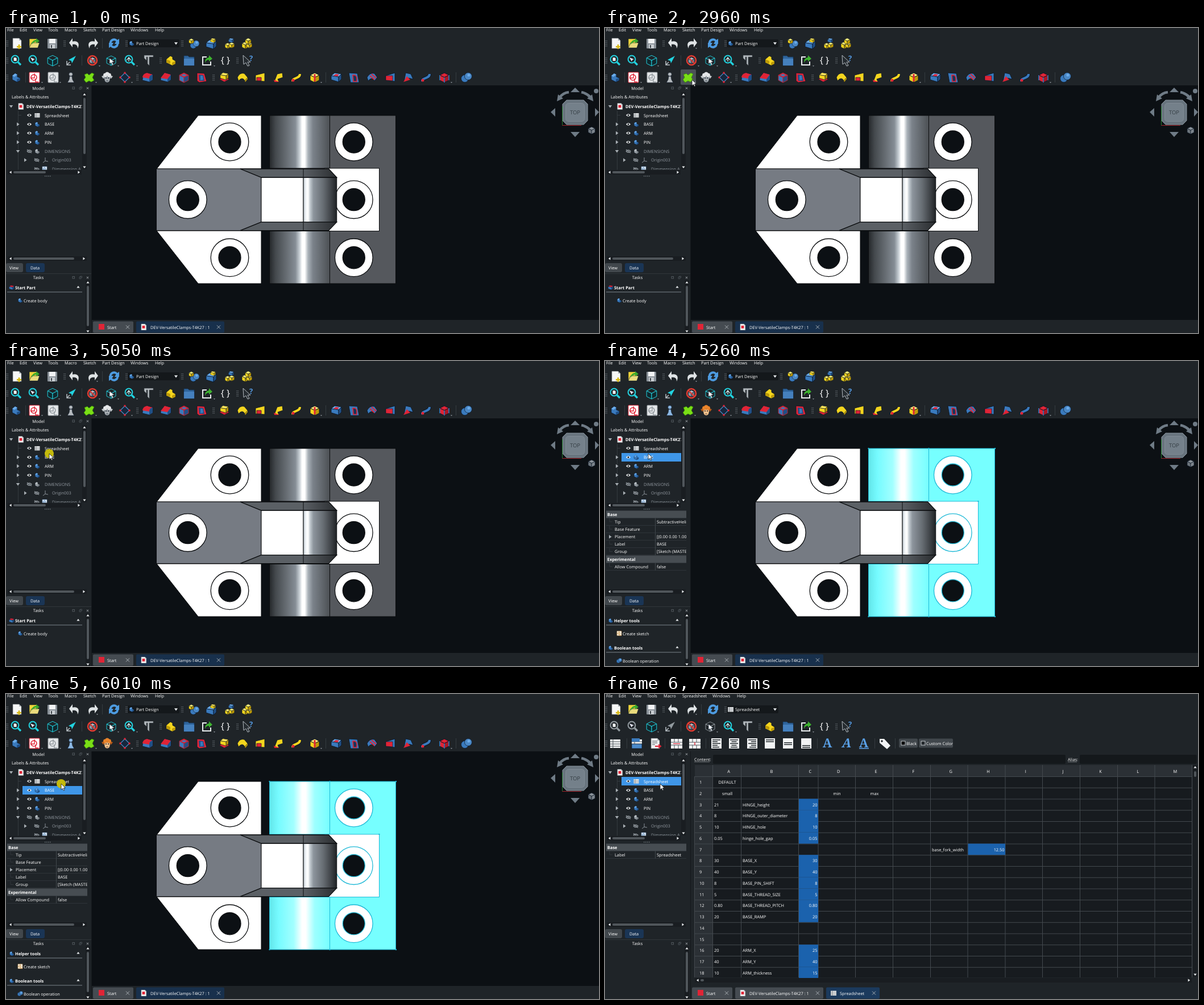
Recreate the animation shown at these times as an HTML page. Size 1043x537 px, loop 8 s.

```html
<!DOCTYPE html>
<html lang="en">
<head>
<meta charset="utf-8">
<title>Parametric model</title>
<style>
html, body { margin: 0; width: 100%; height: 100%; overflow: hidden; background: #1f2428; }
svg { display: block; width: 100%; height: 100%; }
text { font: 7.4px "Open Sans", "Noto Sans", sans-serif; fill: #fff; white-space: pre; text-rendering: geometricPrecision; }
.b { font-weight: 700; }
.dim { fill: #9299a0; }
</style>
</head>
<body>
<svg id="stage" viewBox="0 0 1043 537" preserveAspectRatio="xMinYMin"></svg>
<script>
const NAME = 'DEV-VersatileClamps-T4K27';
const BG = '#1f2428', VIEW = '#0c1014', CYAN = '#22d3e0', BLUE = '#3a7abd', NAVY = '#204f86',
  SKY = '#6cacea', YEL = '#f4d51e', GOLD = '#bd9a08', RED = '#e02436', INK = '#0a1626', GREY = '#8b9299', PALE = '#e8ebed';

// Drawing helpers
const P = (d, fill = 'none', stroke = 'none', w = 1) => `<path d="${d}" fill="${fill}" stroke="${stroke}" stroke-width="${w}"/>`;
const R = (x, y, w, h, fill, r = 0, stroke = 'none', more = '') => `<rect x="${x}" y="${y}" width="${w}" height="${h}" rx="${r}" fill="${fill}" stroke="${stroke}" ${more}/>`;
const C = (x, y, r, fill = 'none', stroke = 'none', w = 1) => `<circle cx="${x}" cy="${y}" r="${r}" fill="${fill}" stroke="${stroke}" stroke-width="${w}"/>`;
const T = (x, y, s, cls = '', anchor = 'start') =>
  `<text x="${x}" y="${y + 2.7}" class="${cls}" text-anchor="${anchor}">${s.replace('&', '&amp;')}</text>`;
const big = (x, base, s, style) => `<text x="${x}" y="${base}" text-anchor="middle" style="${style}">${s}</text>`;
const G = (id, body, extra = '') => `<g id="${id}" ${extra}>${body}</g>`;
const at = (x, y, body, s = 1) => `<g transform="translate(${x} ${y}) scale(${s})">${body}</g>`;
const grad = (id, stops) => `<linearGradient id="${id}">${stops.map(([o, c]) => `<stop offset="${o}" stop-color="${c}"/>`).join('')}</linearGradient>`;
const tri = (x, y, dir, s = 3, c = PALE) =>
  `<path d="M${-s} ${-s * .6}H${s}L0 ${s * .8}z" fill="${c}" transform="translate(${x} ${y}) rotate(${{ d: 0, l: 90, u: 180, r: 270 }[dir]})"/>`;
const grip = (x, y) => [-5, -2, 1, 4].map(d => R(x - 1.5, y + d, 1, 1.4, '#767d83') + R(x + .7, y + d, 1, 1.4, '#767d83')).join('');
const vline = (x, y) => R(x, y - 9, 1, 18, '#353b40');
const nook = (x, y) => P(`M${x} ${y}h3l-1.5 2z`, GREY);

// Icons, centred on 0,0
const slab = (a, b, c) => P('M-9-3L-3-8 9-6 4-1z', a, INK, .8) + P('M-9-3L4-1V8L-9 4z', b, INK, .8) + P('M4-1L9-6V3L4 8z', c, INK, .8);
const cube = (a, b, c, s = INK) => P('M-8-4L0-8 8-4 0 0z', a, s, .9) + P('M-8-4L0 0V9L-8 5z', b, s, .9) + P('M8-4L0 0V9L8 5z', c, s, .9);
const body = (a = SKY, b = BLUE, c = NAVY) => P('M-7-3L-2-7 2-5V-1L7 1V5L1 8-7 4z', b, INK, .8) + P('M-7-3L-2-7 2-5-3-1z', a) + P('M1 8V3L7 1V5z', c);
const page = fill => P('M-7-9H4L8-5V9H-7z', fill, '#6d7478', .7) + P('M4-9V-5H8z', '#aeb4b8');
const lens = (c, inner = '') => C(-2, -2, 6.4, 'none', c, 2) + P('M3 3L8 8', 'none', c, 3.2) + inner;
const swoop = P('M-5-3C4-6 10-1 5 9C5 3 2 1-5 2z', '#dfe3e5') + P('M-10-1L-4-9V7z', '#dfe3e5');
const bend = (c, d = GOLD) => P('M-7 7C-8 0 6 3 6-6', 'none', INK, 6) + P('M-7 7C-8 0 6 3 6-6', 'none', c, 4) + C(-6, 5, 2.5, d);
const ball = C(-3, 2, 6.5, BLUE, INK, .7) + C(3, -2, 6.5, '#4a88c6', INK, .7) + C(4, -4, 2.5, SKY);
const pawn = c => C(0, -5.5, 3.3, c, INK, .6) + P('M-2-2H2L3 4 6 9H-6L-3 4z', c, INK, .6);
const sheep = (wool, face, ear) => P('M-5-4L-10-2-7 2-4 1zM5-4L10-2 7 2 4 1z', ear) +
  P('M-5-2Q-6 9 0 9Q6 9 5-2z', face, INK, .4) + C(-3.5, -4, 3.4, wool) + C(3.5, -4, 3.4, wool) + C(0, -6, 3.6, wool) +
  C(-2, 1, 1, INK) + C(2, 1, 1, INK) + P('M-1.5 6H1.5', 'none', INK, .8);
const sketch = (sheet, c) => R(-9, -9, 18, 18, sheet, 1, c) + C(-1, 0, 5, 'none', c, 1.6) + P('M-7 1H0V-7M2 2V8H7', 'none', c, 1.4);
const lines = (ws, top, a) => R(-9, -9, 18, 18, '#f2f4f5') + ws.map((w, i) => R(a < 0 ? -7 : a ? 7 - w : -w / 2, top + i * 3.2, w, 1.5, '#22282c')).join('');
const table = R(-9, -7, 18, 15, '#f2f4f5') + P('M-9-3H9M-9 1H9M-9 5H9M-4-7V8', 'none', '#4c545a', 1);
const eye = (x, y) => P(`M${x - 4} ${y}Q${x} ${y - 4.5} ${x + 4} ${y}Q${x} ${y + 4.5} ${x - 4} ${y}z`, '#f1f3f4') + C(x, y, 1.5, BG);
const noEye = (x, y) => at(x, y, P('M-4 0Q0-4 4 0Q0 4-4 0M-4-3L4 3', 'none', '#8d949a', 1.4));
const docIcon = (x, y) => at(x, y, page('#f2f4f5') + R(-4, -4, 8, 8, RED), .6);
const close = (x, y, s = 3) => P(`M${x - s} ${y - s}l${2 * s} ${2 * s}m0 ${-2 * s}l${-2 * s} ${2 * s}`, 'none', '#aab0b5', 1);

const menu = list => list.map(([x, s]) => T(x, 3, s)).join('');
const menuHead = [[2, 'File'], [24, 'Edit'], [48, 'View'], [74, 'Tools'], [103, 'Macro']];
const combo = (label, icon) => R(214, 20, 91, 14, '#14181b', 2) + at(221, 27, icon, .55) + T(229, 27.5, label) + tri(299, 27, 'd');

function commonBars() {
  const wavy = P('M-8-1A8 8 0 0 1 6-6L9-8V1H1L3.5-3.5A5 5 0 0 0-4.5-1z', '#4d9be0');
  return at(19, 27, page('#f6f7f7') + P('M4 2V10M0 6H8', 'none', '#d6b70e', 2.4)) +
    at(50, 27, P('M-9-8H3L6-5V8H-9z', '#f0d53a', INK, .6) + P('M-9 8L-5-1H9L6 8z', '#eadb7c', INK, .6) + P('M-5 2C-4-5 0-6 3-6V-9L9-4 3 0V-3C0-3-2-1-5 2z', '#39a82d')) +
    at(81, 27, R(-8, -8, 17, 17, '#899198', 1) + R(-5, -8, 11, 8, '#f1f3f4') + R(-4, 2, 9, 7, '#c9ced2') + R(-2, 3, 2, 5, '#40474d')) +
    grip(103, 27) + at(121, 27, swoop) + `<g transform="translate(152 27) scale(-1 1)">${swoop}</g>` + nook(159, 35) + vline(169, 27) +
    at(190, 27, wavy + `<g transform="rotate(180)">${wavy}</g>`) + grip(212, 27) + grip(2, 27) + grip(2, 57) + grip(2, 87) +
    at(82, 57, cube('none', '#10282e', '#10282e', CYAN), 1.1) + nook(92, 66) + vline(133, 57) +
    at(152, 57, at(0, 0, cube('#aeb8c2', '#8a98a5', '#6d7c8a'), .7) + C(0, 0, 8, 'none', '#e53c32', 2.5) + P('M-6-6L6 6', 'none', '#e53c32', 2)) + nook(163, 66) +
    at(218, 57, lens(CYAN, P('M-6 0L-2-5 2 0M-2-5V2', 'none', '#dff', 1.2))) + nook(229, 66) +
    at(251, 57, P('M-8-9H8V-6H1V9L-2 6V-6H-4V0L-8-4z', '#b3b9bd', '#42494e', .6)) + grip(272, 57) +
    at(290, 57, P('M-8-2L-1-8 3-6V-2L8 1V6L2 9-8 4z', YEL, INK, .8) + P('M2 9V4L8 1V6zM-8-2L-1 1V6L-8 4z', GOLD)) +
    at(322, 57, P('M-9-8H-2L0-6H9V9H-9z', '#2f659d', '#17395d', .8) + R(-9, -3, 18, 12, '#4580bd')) +
    at(354, 57, P('M-1-6H-8V8H6V2', 'none', '#e9edef', 2) + P('M-4 4C-4-3 0-5 3-5V-9L9-3 3 2V-1C0-1-2 0-4 4z', '#3db32f')) + nook(365, 66) +
    big(386, 62, '{ }', 'font-size:16px') + grip(407, 57) +
    at(425, 57, P('M-8-9L5 3 0 3 3 9 0 10-3 4-7 7z', '#262c31', '#b6bdc2', 1)) + big(431, 58, '?', 'font-size:13px;font-weight:700;fill:#5499e0');
}
const viewTools = c => at(18, 57, lens(c, at(-2, -2, page('#eef1f2'), .34))) +
  at(49, 57, lens(c, P('M-6-5L2-2-1-1-2 2z', '#eef'))) +
  at(115, 57, P('M-8 8L-3 3M-8 1V8H-1', 'none', '#b9c0c5', 1.5) + P('M-5-1L8-8 1 5 0 1z', c)) +
  at(185, 57, cube('none', 'none', 'none', c) + P('M-3-4L6 3 2 3 4 8 2 9 0 4-3 6z', '#eef1f2', INK, .6)) + nook(196, 66);

function designBars() {
  const bl = slab(SKY, BLUE, NAVY), yl = slab('#ffe75a', YEL, GOLD), yc = cube('#fff07a', YEL, GOLD);
  const icons1 = [[330, at(2, 2, ball, .85) + at(-4, -4, yc, .55)], [361, at(0, 2, bl) + at(3, -5, yl, .5)],
    [393, at(-3, 4, yc, .6) + at(4, 3, yc, .6) + at(3, -5, bl, .5)], [424, at(-3, 3, yc, .75) + at(4, 3, yc, .6) + at(2, -4, yc, .65)]];
  const icons3 = [
    [18, body()], [50, sketch('#fff', RED)], [83, sketch('#e4e7e9', '#959ca1')],
    [209, P('M0-8L8 0 0 8-8 0z', '#15283e', '#4c8ed0', 1.2) + [[0, -8], [8, 0], [0, 8], [-8, 0]].map(p => C(...p, 1.8, RED)).join('')],
    [249, P('M-9 3Q-8-6-1-8L9-5V4L3 8-9 5z', BLUE, INK, .8) + P('M-9 0Q-8-7-1-8L9-5Q3-4 3 2z', RED) + P('M3 2Q3-4 9-5V4L3 8z', NAVY)],
    [281, P('M-9 2L-2-8 9-5V4L3 8-9 5z', BLUE, INK, .8) + P('M-9 1L-2-8 9-5 3 3z', RED) + P('M3 3L9-5V4L3 8z', NAVY)],
    [313, cube(RED, BLUE, NAVY, '#c81f30') + P('M-5-4L0-6 5-4 0-2z', BLUE)],
    [344, P('M-8-8L5-7 9 7-4 9-8 6z', RED, INK, .8) + P('M-5-5L3-4 5 6-4 6z', NAVY) + P('M-2-3L2-3 3 4-2 5z', BLUE)],
    [384, P('M-9 3L0 0 9 3 0 8z', RED, INK, .6) + at(0, -2, yl, .8)],
    [416, P('M-9 0Q-5-9 3-7L9 0 4 6Q0-2-7 6z', YEL, INK, .8) + P('M4 6L9 0V3L5 8z', GOLD)],
    [447, P('M-8-4L8-8V7L-8 6z', YEL, INK, .8) + P('M-6 0H2V6H-6z', RED, INK, .7)],
    [479, P('M-7 7L-2-6 7-8 8 0-1 3 1 8z', YEL, INK, .8) + P('M-8 4L2 8-7 8z', RED)],
    [511, bend(YEL, RED)], [543, yc + R(-1.5, -6, 3, 13, RED)],
    [581, bl + P('M-5-3L-1-6 5-5 2-2z', RED)],
    [612, P('M-9-8L6-7 9 9H-6z', BLUE, INK, .8) + P('M-2-4Q5-5 5 2V7H-1z', '#17355a', RED, 1.6)],
    [644, P('M-9 0Q-4-9 4-7L9 0 4 6Q0-2-7 6z', BLUE, INK, .8) + P('M-4-3L4 4M-1-6L7 1', 'none', RED, 2)],
    [676, P('M-8-3L8-8V7L-8 5z', BLUE, INK, .8) + P('M-8-3H4V6L-8 5z', RED, INK, .6)],
    [707, P('M-7 8L-4-8 5-6 9 3 1 1z', BLUE, INK, .8) + P('M-8 8L-2-2 4 4z', RED)],
    [739, bend(BLUE, RED)], [771, cube(RED, RED, '#a91625') + P('M-8-4V5M0 0V9M8-4V5', 'none', BLUE, 1.6)], [810, ball]
  ];
  return menu([...menuHead, [136, 'Sketch'], [169, 'Part Design'], [219, 'Windows'], [262, 'Help']]) + combo('Part Design', body()) + grip(310, 27) +
    icons1.map(([x, b]) => at(x, 27, b)).join('') + viewTools(CYAN) + G('hover', R(133, 73, 27, 27, '#4b5157', 2)) +
    icons3.map(([x, b]) => at(x, 87, b)).join('') +
    at(146, 87, P('M-8-5L-3-7 0-4 5-8 9-6 6 0 9 5 4 8 0 6-5 9-9 4-6 0z', '#7ade16', '#378a0a', .8)) +
    [62, 94, 157, 220, 553, 782].map(x => nook(x, 95)).join('') +
    G('idleIcons', at(114, 87, pawn('#b5babe')) + at(178, 87, sheep('#e4e6e8', '#a7adb1', '#c1c6c9'))) +
    G('liveIcons', at(114, 87, pawn('#8db8e3')) + at(178, 87, sheep('#e9842b', '#f5c28b', '#b55817'))) +
    vline(34, 87) + [231, 365].map(x => grip(x, 87)).join('') + vline(562, 87) + vline(791, 87);
}

// 3D view
const ring = (x, y, stroke) => C(x, y, 33.3, '#fff', stroke, 1.3) + C(x, y, 19.5, VIEW, stroke, 1.3);
const base = (fill, cyl, edge) => R(569.5, 154, 116, 296, fill, 0, edge) + R(463.5, 154, 106, 93, `url(#${cyl})`, 0, edge) +
  R(463.5, 357.5, 106, 92.5, `url(#${cyl})`, 0, edge) + R(560, 247, 96.5, 110.5, '#fff', 0, edge) + [200.5, 302.2, 404.3].map(y => ring(611.8, y, edge)).join('');
const mirror = s => s + `<g transform="matrix(1 0 0 -1 0 604.6)">${s}</g>`;
function scene() {
  const K = '#0b0d0f', steel = '#6f7b86', rim = '#8a959f';
  const arm = P('M264.5 248H412L449 263V341.6L412 356.6H264.5z', '#767b83', K) + R(449, 263, 74, 78.6, '#fff', 0, K) + R(523, 263, 58.7, 78.6, 'url(#armCyl)', 0, K) +
    mirror(P('M412 248H567.5L581.7 263H449z', 'url(#chamfer)', K, 1.3) + P('M523 248V263', 'none', K)) + ring(319.8, 302.2, K);
  const cubeNav = P('M986 127H1016L1023 134V163L1016 170H986L979 163V134z', '#68747e', rim) + R(984.5, 132.5, 33, 32, '#74808a', 5, '#808b95') +
    big(1001, 152, 'TOP', 'font-size:9.5px;fill:#343c43') +
    P('M978.5 138V171.5', 'none', '#237a2a') + P('M978.5 171.5H1012', 'none', '#a1242b') +
    P('M1001 105L1009 113H993zM1001 192L1009 183H993zM958 148L966 141V156zM1043 148L1036 141V156z', steel) +
    P('M974 122Q980 114 990 113M1012 113Q1022 115 1028 122', 'none', steel, 4.5) + P('M969 129L971 117 980 124zM1033 129L1031 117 1022 124z', steel) +
    C(1038, 111, 4, steel) + at(1030, 180, cube('#8b939a', '#6d757c', '#7d858c'), .75);
  return R(151, 101, 892, 413, VIEW) +
    P('M338 154H449V248H265z', '#fff', K) + P('M338 450H449V357H265z', '#fff', K) + ring(393.5, 200.5, K) + ring(393.5, 404.3, K) +
    G('basePlain', base('#55585d', 'cyl', K)) + G('basePicked', base('#76ffff', 'cylPick', '#1fb9d6') +
      [[463.5, 154], [686, 154], [463.5, 450], [686, 450], [569.5, 154], [569.5, 450], [656.5, 247]].map(p => C(...p, 1.2, '#1fb9d6')).join('')) + arm + cubeNav;
}

// Side panel
const dock = (y, s) => T(57, y, s, '', 'middle') + R(117, y - 2, 3.5, 3.5, 'none', 0, '#50575c') + P(`M129 ${y + 2}v-3h3v3zM130.5 ${y - 1}v-1.5h3v3`, 'none', '#50575c', .8) + close(143.5, y, 1.6);
const vbar = (x, up, a, b, down) => R(x - 4, up - 4, 8, down - up + 8, '#191d21') + tri(x, up, 'u', 2.6) + R(x - 2, a, 4, b - a, '#50565b', 2) + tri(x, down, 'd', 2.6);
const hbar = (y, l, a, b, r) => R(l - 5, y - 4, r - l + 10, 8, '#191d21') + tri(l, y, 'l', 2.6) + R(a, y - 2, b - a, 4, '#50565b', 2) + tri(r, y, 'r', 2.6);
const pick = (id, y) => G(id, R(29, y - 7.5, 105, 15, '#3f96e8'));
function tree() {
  const parts = [['BASE', 169.5], ['ARM', 185], ['PIN', 201]].map(([s, y]) => tri(21, y, 'r', 3.2, '#a9b0b5') + eye(41, y) + at(55, y, body(), .55) + T(68, y, s)).join('');
  return T(10, 121, 'Labels & Attributes') + pick('pickBase', 169.5) + pick('pickSheet', 153.5) +
    `<g clip-path="url(#treeClip)">` + P('M21.5 146V250M21.5 153.5H27', 'none', '#343a3f') + tri(9, 138, 'd', 3.2, '#a9b0b5') + docIcon(26, 138) + T(36, 138, NAME, 'b') +
    eye(41, 153.5) + at(55, 153.5, table, .5) + T(68, 154, 'Spreadsheet') + parts +
    tri(21, 217, 'd', 3.2, '#a9b0b5') + noEye(41, 217) + at(55, 217, body('#c3c8cc', '#9aa1a6', '#71787d'), .55) + T(68, 217, 'DIMENSIONS', 'dim') +
    tri(34, 232.5, 'r', 3.2, '#a9b0b5') + noEye(54, 232.5) + P('M69 228V234L65 237M69 234L74 235', 'none', GREY) + T(81, 232.5, 'Origin003', 'dim') +
    noEye(54, 248.5) + at(68, 248, sketch('#e7eaec', '#4a86c6'), .45) + T(81, 248.5, 'Dimmension A', 'dim') + '</g>' +
    vbar(138, 117, 123, 222, 245) + hbar(254, 8, 13, 70, 128) + [0, 3, 6, 9].map(d => R(68 + d, 260, 1.5, 1.5, '#6d747a')).join('');
}
const propHead = (y, s) => R(2, y - 6.5, 141, 13, '#474d52') + T(4, y, s, 'b');
const prop = ([y, k, v]) => R(2, y + 6, 141, .6, '#3a4045') + R(88, y - 6.5, .8, 13, '#4a5055') + P(`M8 ${y - 6}v6h5`, 'none', '#363c41', .8) + T(17, y, k) + T(91, y, v);
const task = (y, s, icon) => at(10, y, icon, .5) + T(16, y, s, 'b') + tri(127, y - 1, 'u', 2.6) + R(2, y + 7, 132, 1.6, '#596066');
function panel() {
  return R(0, 101, 151, 436, BG) + dock(106, 'Model') + tree() +
    G('propsBase', propHead(270, 'Base') + [[283, 'Tip', 'SubtractiveHelix'], [296, 'Base Feature', ''], [309.5, 'Placement', '[(0.00 0.00 1.00)'], [322.5, 'Label', 'BASE'], [335.5, 'Group', '[Sketch (MASTER)']].map(prop).join('') +
      tri(9, 309.5, 'r', 3.2, '#a9b0b5') + propHead(349, 'Experimental') + prop([362, 'Allow Compound', 'false']), 'clip-path="url(#propClip)"') +
    G('propsSheet', propHead(270, 'Base') + prop([283, 'Label', 'Spreadsheet'])) +
    hbar(406, 8, 13, 120, 137) + R(0, 414, 30, 16, '#41474c', 3) + T(14, 422, 'View', '', 'middle') + R(35, 414, 33, 16, '#1a3555', 3) + T(51, 422, 'Data', '', 'middle') +
    R(0, 432, 150, 1, '#31373b') + dock(439.5, 'Tasks') + vbar(144, 448, 454, 525, 534) +
    G('taskStart', task(457, 'Start Part', slab(RED, BLUE, NAVY)) + at(25, 479.5, body(), .5) + T(31, 480, 'Create body')) +
    G('taskBase', task(457, 'Helper tools', body()) + at(25, 479.5, sketch('#f1f3f4', '#d18a25'), .45) + T(31, 480, 'Create sketch') +
      task(505, 'Boolean tools', body()) + at(25, 527.5, ball, .5) + T(31, 528, 'Boolean operation')) + R(150, 101, 1, 436, '#14181b');
}
const tab = (x, w, fill, icon, tx, s) => R(x, 516.5, w, 20, fill, 2) + icon + T(tx, 527, s) + close(x + w - 10, 526.5);
const tabs = fill => R(151, 514, 892, 23, BG) + tab(153, 71, '#454b51', R(163, 521, 10, 10, RED), 178, 'Start') +
  tab(229, 155, fill, docIcon(242, 526.5), 254, NAME + ' : 1');

// Spreadsheet workbench
function sheet() {
  const xs = [158, 190, 240, 341, 375.5, 441, 507, 573, 638.5, 704.5, 770, 836, 902, 967.5, 1033];
  const H = 19.75, top = 145.5, mid = r => top + H * (r - .5);
  const cells = [[3, '21', 'HINGE_height', '20'], [4, '8', 'HINGE_outer_diameter', '8'], [5, '10', 'HINGE_hole', '10'], [6, '0.05', 'hinge_hole_gap', '0.05'],
    [8, '30', 'BASE_X', '30'], [9, '40', 'BASE_Y', '40'], [10, '8', 'BASE_PIN_SHIFT', '8'], [11, '5', 'BASE_THREAD_SIZE', '5'], [12, '0.80', 'BASE_THREAD_PITCH', '0.80'],
    [13, '20', 'BASE_RAMP', '20'], [16, '20', 'ARM_X', '25'], [17, '40', 'ARM_Y', '40'], [18, '10', 'ARM_thickness', '15']];
  const fill = (x, w, r) => R(x, top + H * (r - 1) - .5, w, H, '#1b62ad');
  let s = R(151, 101, 892, 413, BG) + T(157, 115, 'Content:') + R(190, 107, 620, 16, '#14181b', 2) + T(814, 115, 'Alias:') + R(835, 107, 206, 16, '#14181b', 2) +
    P('M157 119.5h27M814 119.5h16', 'none', '#c9ced2', .5) + R(158, 125, 875, 374, '#171b1f') + R(158, 125, 875, 20.5, '#2b3035') + R(158, 125, 32, 374, '#2b3035');
  xs.forEach((x, i) => {
    s += R(x - 1, i ? 125 : 145, 1, i ? 374 : 354, '#43494e');
    if (i && i < 14) s += T((x + xs[i + 1]) / 2 + 2.5, 136, String.fromCharCode(64 + i), '', 'middle');
  });
  for (let r = 1; r <= 18; r++) s += R(158, top + H * (r - 1) - .5, 875, 1, '#43494e') + T(166, mid(r), '' + r);
  cells.forEach(([r, a, b, c]) => s += fill(341, 34, r) + T(192, mid(r), a) + T(242, mid(r), b) + T(373.5, mid(r), c, '', 'end'));
  s += fill(638.5, 65.5, 7) + T(215, mid(1), 'DEFAULT', '', 'middle') + T(215, mid(2), 'small', '', 'middle') + T(408, mid(2), 'min', '', 'middle') + T(474, mid(2), 'max', '', 'middle') +
    T(575, mid(7), 'base_fork_width') + T(702.5, mid(7), '12.50', '', 'end') + vbar(1038, 129, 136, 146, 494) + hbar(504, 163, 168, 174, 1027);
  const arrow = P('M-4 0H5M2-3L6 0 2 3', 'none', RED, 2), long = [14, 9, 14, 9, 12];
  const letter = (x, style) => big(x, 94, 'A', `font:700 22px 'Noto Serif',serif;fill:#5aa0e6;${style}`);
  const merge = R(-10, -8, 20, 17, '#f2f4f5') + P('M-10-2H10M-10 3H10M-4-8V-2M3-8V-2M-4 3V9M3 3V9', 'none', '#4c545a');
  const bars = [[18, table], [56, table + R(-9, -9, 14, 6, BLUE) + P('M-9 9V1H9V9z', '#4b8aca', INK, .7)], [88, page('#f2f4f5') + P('M-5-4H4M-5-1H4M-5 2H0', 'none', '#4c545a') + at(4, 5, arrow)],
    [126, merge + P('M-6 .5H6', 'none', RED, 1.2)], [158, merge + P('M0-2V3', 'none', RED, 1.4)],
    [196, lines(long, -7, -1)], [227, lines(long, -7, 0)], [259, lines(long, -7, 1)], [290, lines([14, 14], -7, 0)], [322, lines([14, 14], -2, 0)], [354, lines([14, 14], 3, 0)],
    [492, P('M-9-8H-1L10 4 4 10-9-1z', '#f2f4f5') + C(-5, -4, 1.8, BG)]];
  const swatch = (x, w, c, t) => R(x, 78.5, w, 16, '#41474c', 2) + R(x + 4, 83, 7, 7, c, 0, '#c8cdd1') + T(x + 13, 87, t);
  return menu([...menuHead, [136, 'Spreadsheet'], [189, 'Windows'], [232, 'Help']]) + combo('Spreadsheet', table) + viewTools('#929a9f') +
    bars.map(([x, b]) => at(x, 87, b)).join('') + letter(391, '') + letter(425, 'font-style:italic') + letter(455, '') + R(447, 95, 17, 1.6, '#5aa0e6') +
    [38, 105, 177, 373, 474, 510].map(x => vline(x, 87)).join('') + swatch(517, 33, '#000', 'Black') + swatch(552, 60, '#22272b', 'Custom Color') +
    s + tabs('#454b51') + tab(389, 94, '#1b3a5d', at(402, 526.5, table, .55), 413, 'Spreadsheet');
}

document.getElementById('stage').innerHTML = '<defs>' +
  grad('cyl', [[0, '#25282b'], [.1, '#44494d'], [.28, '#676d73'], [.43, '#858d95'], [.5, '#c9d0d6'], [.54, '#fff'], [.585, '#fff'], [.64, '#aab2b9'], [.72, '#7b828a'], [1, '#4c5054']]) +
  grad('cylPick', [[0, '#62e6ea'], [.15, '#76fbff'], [.4, '#a2ffff'], [.54, '#fff'], [.6, '#fff'], [.75, '#9dffff'], [1, '#76ffff']]) +
  grad('armCyl', [[0, '#b4bdc4'], [.07, '#f2f6f9'], [.14, '#fff'], [.2, '#c3cbd1'], [.3, '#8d959d'], [.6, '#666c72'], [.85, '#3b3f43'], [1, '#1f2225']]) +
  grad('chamfer', [[0, '#5b6065'], [.65, '#5b6065'], [1, '#2a2d30']]) +
  '<clipPath id="treeClip"><path d="M0 126H133.5V249.5H0z"/></clipPath><clipPath id="propClip"><path d="M0 260H143V400H0z"/></clipPath></defs>' +
  R(0, 0, 1043, 537, BG) + commonBars() + G('design', designBars() + scene() + tabs('#18304c')) + G('sheet', sheet()) + panel() +
  G('click', C(0, 0, 8, '#c4ba0c')) + G('cursor', P('M0 0V10.5L2.6 8.2 4.3 12 6 11.2 4.3 7.6H7.6z', '#fff', '#15181b', .8));

// Pointer moves: start, end, steps, points travelled
const moves = [
  [1120, 1190, 2, [[996, 536], [1012, 533], [1028, 530]]],
  [1390, 1670, 5, [[1028, 530], [860, 400], [640, 235], [480, 155], [425, 180], [412, 220]]],
  [1930, 2480, 9, [[412, 220], [419, 227], [455, 239], [514, 215], [500, 160], [430, 125], [340, 112], [280, 109], [245, 109], [229, 109]]],
  [2680, 2960, 5, [[229, 109], [205, 114], [180, 106], [163, 96], [155, 92], [153, 91]]],
  [3900, 4030, 2, [[153, 91], [153, 78]]],
  [4230, 4780, 9, [[153, 78], [148, 85], [112, 130], [82, 157], [76, 163]]],
  [5530, 5600, 2, [[76, 163], [86, 155]]],
  [5730, 5870, 3, [[86, 155], [97, 158]]]
];
const clicks = [[5050, 5260], [5940, 6140], [6870, 6940], [7000, 7140]];
const el = id => document.getElementById(id);
const show = (id, on) => { el(id).style.display = on ? '' : 'none'; };

function pointer(t) {
  const m = moves.filter(v => t >= v[0]).pop();
  if (!m) return null;
  const [a, b, n, pts] = m;
  const k = Math.min(n, Math.floor((t - a) / (b - a) * (n - 1) + 1e-6) + 1);
  const f = k / n * (pts.length - 1), i = Math.min(pts.length - 2, Math.floor(f));
  return pts[i].map((v, j) => v + (pts[i + 1][j] - v) * (f - i));
}

function draw(now) {
  const t = now % 8000, p = pointer(t);
  const baseOn = t >= 5190 && t < 6070, sheetOn = t >= 6070, open = t >= 7260;
  show('design', !open); show('sheet', open);
  show('hover', t >= 2890 && t < 4300);
  for (const id of ['liveIcons', 'basePicked', 'pickBase', 'propsBase', 'taskBase']) show(id, baseOn);
  for (const id of ['idleIcons', 'basePlain']) show(id, !baseOn);
  for (const id of ['pickSheet', 'propsSheet']) show(id, sheetOn);
  show('taskStart', !baseOn && !sheetOn);
  show('cursor', p); show('click', p && clicks.some(([a, b]) => t >= a && t < b));
  if (p) for (const id of ['cursor', 'click']) el(id).setAttribute('transform', `translate(${p})`);
}
const tick = () => { draw(performance.now()); requestAnimationFrame(tick); };
tick();
</script>
</body>
</html>
```
